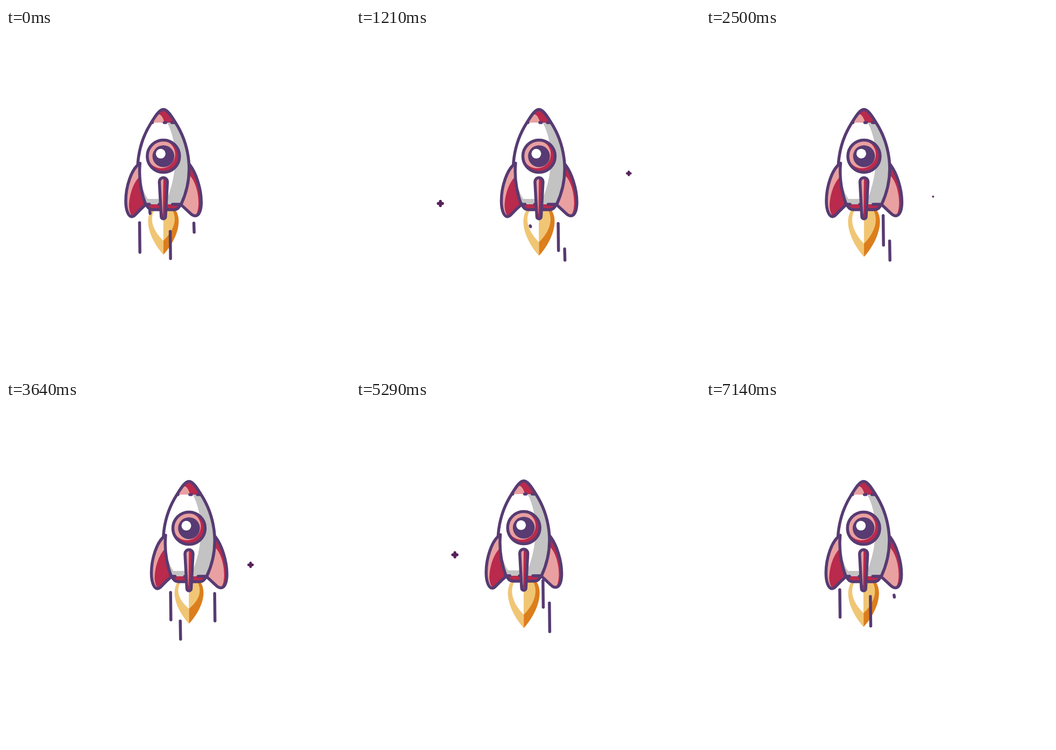
Animation, 640 px wide and 640 px high, one loop 7.21 s. Source, as an HTML page:

```html
<!DOCTYPE html>
<html lang="en">
<head>
<meta charset="utf-8">
<title>Rocket</title>
<style>
  html, body { margin: 0; width: 100%; height: 100%; overflow: hidden; background: #fff; }
  svg { display: block; width: 100%; height: 100%; }
  .ink { fill: none; stroke: #573b72; stroke-width: 5.5; stroke-linecap: round; stroke-linejoin: round; }
  .red { fill: #b92a4c; }
  .pink { fill: #e9a0a0; }
  .grey { fill: #c3c3c3; }
  .gold { fill: #f0c675; }
  .orange { fill: #dc7e1c; }
  .white { fill: #fff; }
  .star { fill: none; stroke: #562158; stroke-width: 5.4; stroke-linecap: round; }
</style>
</head>
<body>
<svg viewBox="0 0 640 640">
  <defs>
    <path id="hull" d="M-33 328C-62 265 -43 208 -22.500 176C-14 162 -7 151.500 0 151.500C7 151.500 14 162 22.500 176C43 208 62 265 33 328"/>
    <path id="leftFin" d="M-43.500 251.500C-60 262 -70 296 -70 322C-70 339 -65 351 -58.500 351C-53 351 -51 344 -33 329C-42 304 -46 277 -43.500 251.500Z"/>
    <path id="rightFin" d="M47 252C61 268 70.500 300 70.500 324C70.500 340 66 349.500 59 349.500C53 349.500 51 345 33 329Z"/>
    <path id="keel" d="M-7.500 286A7.500 7.500 0 0 1 7.500 286L4 351A4 4 0 0 1 -4 351Z"/>
    <clipPath id="inHull"><use href="#hull"/></clipPath>
    <clipPath id="inLeft"><use href="#leftFin"/></clipPath>
    <clipPath id="inRight"><use href="#rightFin"/></clipPath>
    <clipPath id="inRing"><circle cy="238.500" r="30"/></clipPath>
  </defs>
  <g id="stars"></g>
  <g id="rocket">
    <path id="outerLeft" class="gold"/>
    <path id="outerRight" class="orange"/>
    <path id="innerLeft" class="white"/>
    <path id="innerRight" class="gold"/>
    <path id="trails" class="ink"/>

    <use href="#rightFin" class="red"/>
    <path class="pink" clip-path="url(#inRight)" d="M46 272C60 282 67 312 65 332Q64 346 57 351L30 331Z"/>
    <use href="#rightFin" class="ink"/>

    <path class="red" d="M-31 328H31Q28 338 20 338H-20Q-28 338 -31 328Z"/>
    <use href="#hull" class="white"/>
    <g clip-path="url(#inHull)">
      <path class="grey" d="M7 176C26 212 28 264 7 318H-29C-37 306 -42 292 -43 270L-60 330H60V176Z"/>
      <path class="red" d="M-30 140H30V176H-30Z"/>
      <path class="pink" d="M-24 176L-16 165Q-9 157 -4 163Q0 168 2 176Z"/>
    </g>
    <use href="#hull" class="ink"/>
    <path class="ink" d="M-22 176h1.500M1.500 176h3M15.500 176h6"/>
    <path class="ink" d="M-32 328Q-28 338 -20 338H20Q28 338 32 328M-31 328h5M-8 328h7M17 328h16"/>

    <use href="#leftFin" class="pink"/>
    <path class="red" clip-path="url(#inLeft)" d="M-40 273C-56 284 -64 312 -64 332Q-63 345 -58 350L-30 331Z"/>
    <use href="#leftFin" class="ink"/>

    <g clip-path="url(#inRing)">
      <circle class="red" cy="238.500" r="30"/>
      <circle class="pink" cx="-4" cy="235" r="26"/>
    </g>
    <circle class="ink" cy="238.500" r="30"/>
    <circle fill="#573b72" cy="238.500" r="20.300"/>
    <circle class="white" cx="-5" cy="233.800" r="9"/>

    <use href="#keel" class="red"/>
    <path class="pink" d="M-7 286Q-6 279 0 279L-1 345H-4Z"/>
    <use href="#keel" class="ink"/>
  </g>
</svg>
<script>
const LOOP = 7210, STEP = LOOP / 101;
const $ = id => document.getElementById(id);
const unit = v => Math.min(1, Math.max(0, v));
const ease = u => u * u * (3 - 2 * u);

// The rocket sways left, right, left... turning at these times
const LEFT = 292.8, SWING = 48;
const TURNS = [0, 1150, 2390, 3580, 4858, 5835, LOOP];

function drawRocket(t) {
  const leg = TURNS.findIndex(turn => turn > t) - 1;
  const p = ease((t - TURNS[leg]) / (TURNS[leg + 1] - TURNS[leg]));
  const goingRight = leg % 2 === 0;
  const x = LEFT + SWING * (goingRight ? p : 1 - p);
  const lift = goingRight ? Math.sin(Math.PI * p) : 0;
  $("rocket").setAttribute("transform", `translate(${x} ${-lift})`);
}

function halfFlame(side, w, tip) {
  const shoulder = tip - .4 * (tip - 350);
  return `M0 332L${side * w * .72} 336C${side * w * 1.3} 356 ${side * w * .9} ${shoulder} 0 ${tip}Z`;
}

function drawFlame(t) {
  const a = 10 * Math.PI * t / LOOP;
  const squash = unit(.5 + .45 * Math.cos(a - 2) + .15 * Math.cos(2 * a - 4.6));
  const w = 30.5 - 6 * squash;
  for (const [name, side] of [["Left", -1], ["Right", 1]]) {
    $("outer" + name).setAttribute("d", halfFlame(side, w, 428 - 21 * squash));
    $("inner" + name).setAttribute("d", halfFlame(side, w * .74, 404 - 28 * squash));
  }
}

// Each streak grows down its path, then its tail follows after a lag
const SPAN = 77, GROW = 420, LAG = 300;
const BURSTS = [
  { times: [100, 2600, 5845], streaks: [{ x: 34, y: 357, wait: 0 }, { x: 27, y: 339, wait: 277 }] },
  { times: [608, 1973, 4853], streaks: [{ x: 48, y: 355, wait: 0 }, { x: 36, y: 337, wait: 160 }] },
  { times: [1205, 3105, 4300], streaks: [{ x: -16, y: 368, wait: 0 }, { x: -34, y: 358, wait: 258 }, { x: 48, y: 360, wait: 258 }] },
  { times: [3800, 6765], streaks: [{ x: 13, y: 352, wait: 0 }, { x: -44, y: 353, wait: 95 }, { x: 57, y: 363, wait: 353 }, { x: -25, y: 340, wait: 417 }] }
];

function streakPath({ x, y, wait }, age) {
  const head = unit((age - wait) / GROW);
  const tail = unit((age - wait - LAG) / GROW);
  return head > tail ? `M${x - .3} ${y + SPAN * tail}L${x + .3} ${y + SPAN * head}` : "";
}

function drawTrails(t) {
  const paths = BURSTS.flatMap(({ times, streaks }) => times.flatMap(start =>
    streaks.map(streak => streakPath(streak, (t - start + LOOP) % LOOP))));
  $("trails").setAttribute("d", paths.join(""));
}

// Each star twinkles twice per loop
const TWINKLE = 420;
const STARS = [
  { x: 157, y: 326.5, peaks: [1200, 3130] },
  { x: 184, y: 288, peaks: [450, 5290] },
  { x: 422.5, y: 313.7, peaks: [2760, 5690] },
  { x: 455, y: 306.7, peaks: [3560, 6690] },
  { x: 507.5, y: 270.5, peaks: [1335, 4475] }
];

for (const star of STARS) {
  star.node = document.createElementNS("http://www.w3.org/2000/svg", "path");
  star.node.setAttribute("class", "star");
  star.node.setAttribute("d", "M-4 0H4M0 -4V4");
  $("stars").append(star.node);
}

function drawStars(t) {
  for (const { x, y, peaks, node } of STARS) {
    const distance = Math.min(...peaks.map(peak => Math.abs(t - peak)));
    const size = ease(unit(1 - distance / TWINKLE));
    node.setAttribute("transform", `translate(${x} ${y}) scale(${size})`);
    node.style.display = size > 0 ? "" : "none";
  }
}

const began = performance.now();
function frame() {
  const elapsed = (performance.now() - began) % LOOP;
  const t = Math.floor((elapsed + 6) / STEP) % 101 * STEP;
  drawStars(t);
  drawFlame(t);
  drawTrails(t);
  drawRocket(t);
  requestAnimationFrame(frame);
}
frame();
</script>
</body>
</html>
```
